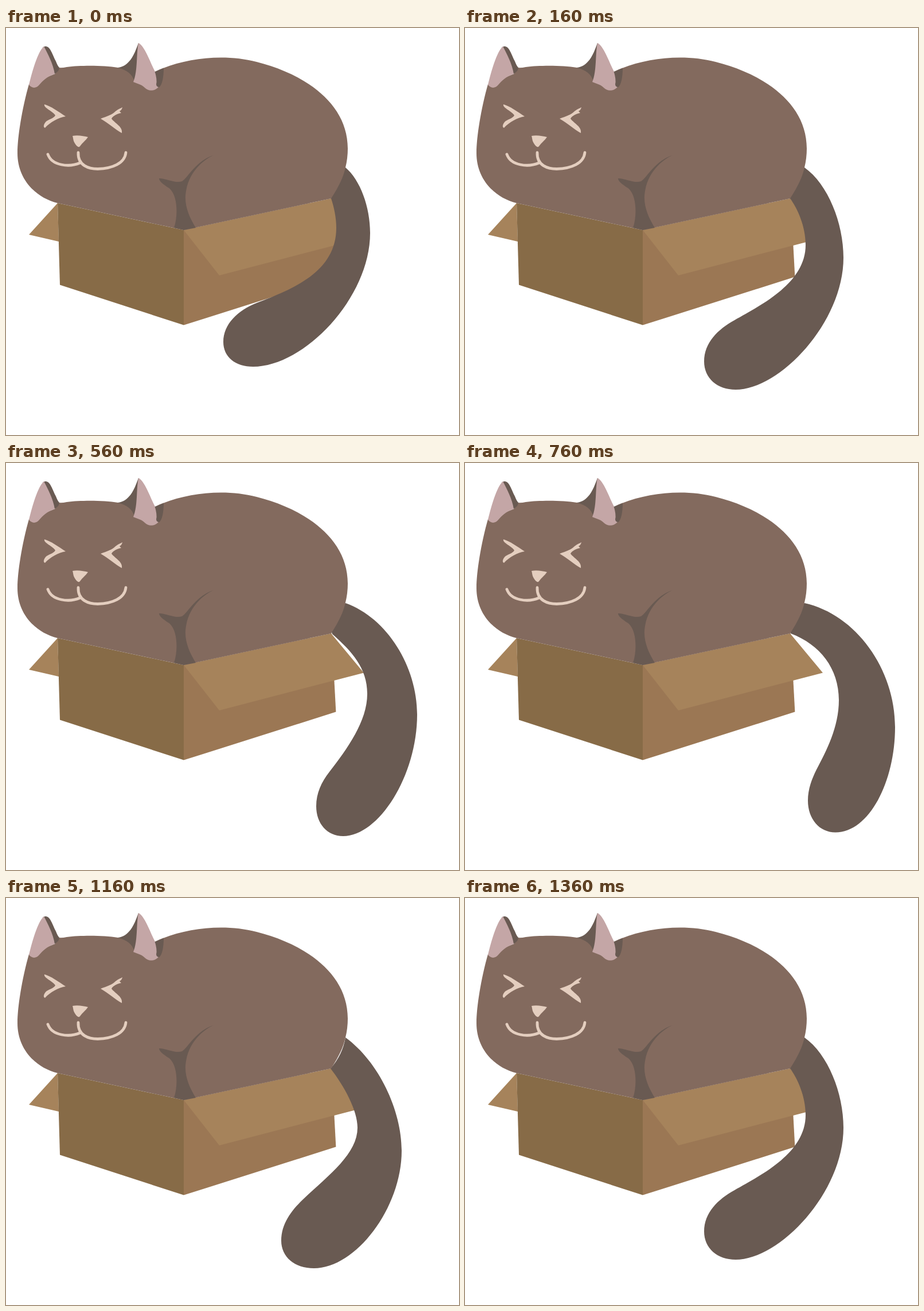
Write an HTML page that moves like this. It is 790 px wide and 709 px high and loops after 1560 ms.

```html
<!DOCTYPE html>
<html lang="en">
<head>
<meta charset="utf-8">
<title>Cat in a box</title>
<style>
  html, body { margin: 0; width: 100%; height: 100%; overflow: hidden; background: #fff; }
  svg { display: block; width: 790px; height: 709px; }
  .fur { fill: #836a5e; }
  .dark { fill: #695a52; }
  .pink { fill: #c4a6a6; }
  .face { fill: #e4cebf; }
  .mouth { fill: none; stroke: #e4cebf; stroke-width: 4.8; stroke-linecap: round; }
  .flap { fill: #a6835b; }
  .front { fill: #876b47; }
  .side { fill: #9b7754; }
  #tail path { opacity: 0; }
</style>
</head>
<body>
<svg viewBox="0 0 790 709">
  <g id="box">
    <path class="flap" d="M90 305L40 360L92 372Z"/>
    <path class="front" d="M90 305L310 352V517.6L94 447.6Z"/>
    <path class="side" d="M310 352L568 297L575.4 433.6L310 517.6Z"/>
    <path class="flap" d="M310 352L567 297L624 365.4L372 431Z"/>
  </g>

  <!-- Tail poses, from curled in to swung out -->
  <g id="tail" class="dark">
    <path d="M592 243C618 265 635 312 635 357C635 470 520 590 431 590C400 590 379 573 379 547C379 515 405 492 437 479C500 455 576 425 576 348C576 330 572 312 567 297L560 270Z"/>
    <path d="M592 243C633 272 660 340 660 400C660 513 549 630 472 630C440 630 417 610 417 581C417 548 441 525 470 509C520 481 594 443 594 378C594 345 580 315 567 297L560 270Z"/>
    <path d="M592 243C650 285 690 370 690 440C690 540 610 645 537 645C503 645 480 625 480 597C480 568 497 545 518 525C565 481 613 445 613 400C613 370 590 328 566 297Q587 273 592 243Z"/>
    <path d="M592 244C665 270 717 355 717 438C717 545 650 650 588 650C560 650 541 628 541 598C541 575 550 556 564 538C595 498 630 450 630 402C630 357 603 328 569 298L560 270Z"/>
    <path d="M592 244C682 264 750 359 750 460C750 555 705 643.5 646 643.5C618 643.5 598 620 598 588C598 568 605 550 613 534C630 502 652 460 652 413C652 358 619 316 568 297L560 270Z"/>
  </g>

  <g id="body">
    <path class="fur" d="M40 98C28 140 20 190 20 218C20 262 50 295 90 305L310 352L567 297C578 280 588 262 592 243Q596 227 596 210C596 130 520 80 437 59C380 44 310 52 260 76L232 60L220 70L195 69C170 65 130 65 106 68Q97 70 93 69L85 80Z"/>
    <path class="dark" d="M364 221C345 228 316 252 313 292C312 312 320 330 331 348L310 352L293 348C301 325 299 285 281 277C274 272 267 267 267 262C280 262 295 271 307 267C318 260 332 230 364 221Z"/>
  </g>

  <g id="ears">
    <path class="dark" d="M64 34C76 26 80 45 87 58Q90 66 93 69Q93 76 84 80Z"/>
    <path class="pink" d="M40 99C46 75 55 42 66 32C73 45 82 62 85 80C71 85 64 92 58 99C52 106 45 105 40 99Z"/>
    <path class="dark" d="M231 26C223 49 214 67 195 69C210 73 221 80 224 94L232 60Z"/>
    <path class="dark" d="M258 77L275 70C275 86 272 100 267 103Q261 105 260 98Z"/>
    <path class="pink" d="M231 26C242 32 250 56 259 74Q264 90 262 98Q262 102 266 103C258 111 248 110 242 104C236 98 229 97 222 94C230 75 227 45 231 26Z"/>
  </g>

  <g id="face">
    <path class="face" d="M67 133C78 136 92 146 104 154C92 156 77 164 68 174C64 173 66 166 71 162C77 158 84 157 86 152C82 145 65 139 67 133Z"/>
    <path class="face" d="M203 138Q202 143 198 145L201 148C195 149 186 153 184 158C190 166 204 172 202 183C192 178 178 165 165 158C175 154 186 151 191 145C196 141 200 140 203 138Z"/>
    <path class="face" d="M116 188C124 186 136 188 143 190C139 196 133 200 129 206C126 210 121 203 119 199C117 195 117 190 116 188Z"/>
    <path class="mouth" d="M73 220C80 240 110 243 129 235M126 217C125 240 145 245.5 160 245.5C185 245 207 236 209 217"/>
  </g>
</svg>
<script>
  const LOOP = 1560;
  const order = [0, 1, 2, 3, 4, 3, 2, 1];
  const startOf = step => step ? 160 + 200 * (step - 1) : 0;

  document.querySelectorAll('#tail path').forEach((pose, i) => {
    const frames = order.map((p, step) => ({
      offset: startOf(step) / LOOP,
      opacity: p === i ? 1 : 0,
      easing: 'step-end'
    }));
    frames.push({ offset: 1, opacity: i === 0 ? 1 : 0 });
    const swing = pose.animate(frames, { duration: LOOP, iterations: Infinity });
    swing.startTime = 0;
  });
</script>
</body>
</html>
```
